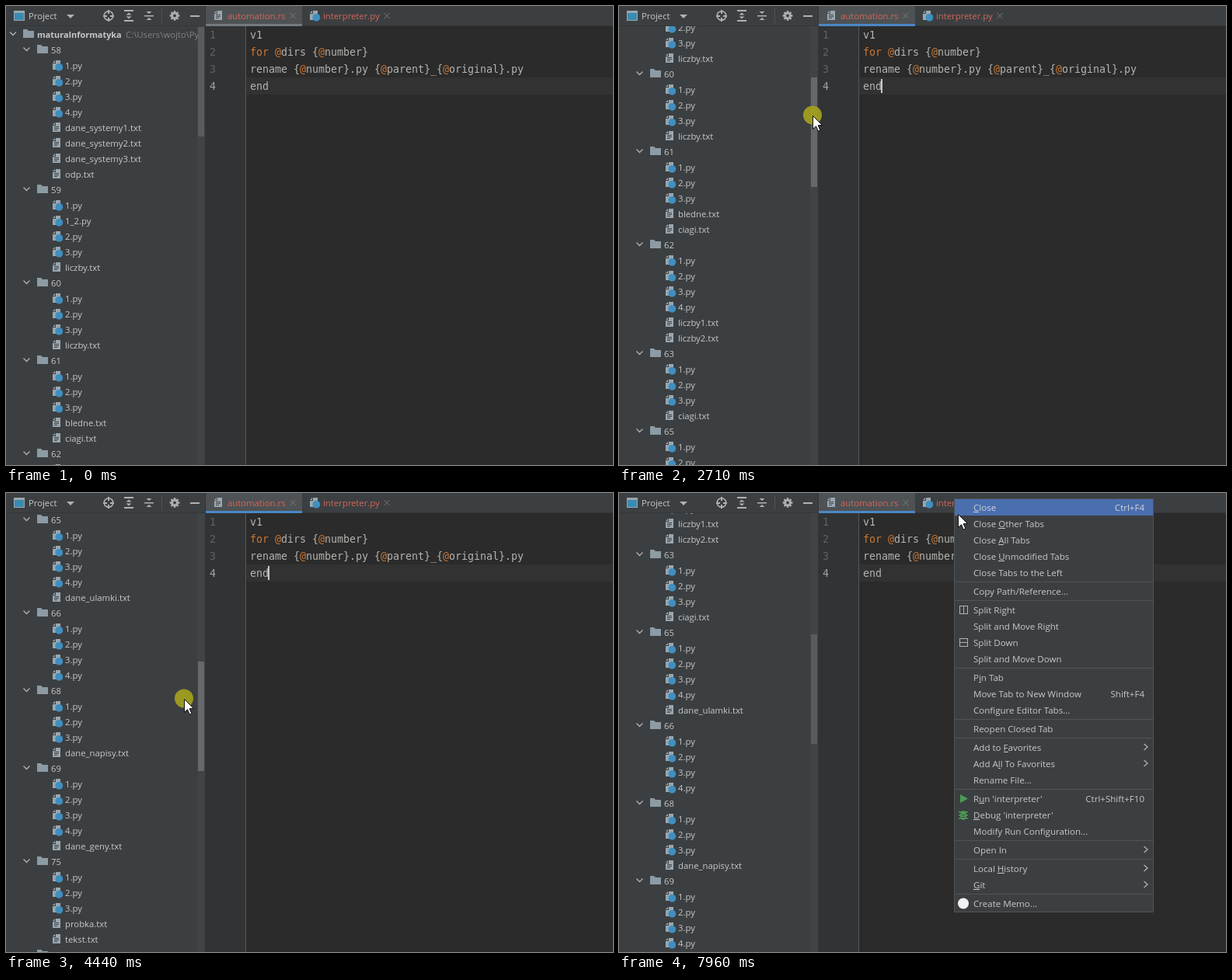
These frames come from a looping animation (781x591 px, 8 s). An HTML page with a canvas:

```html
<!DOCTYPE html>
<html lang="en">
<head>
<meta charset="utf-8">
<title>Project tree</title>
<style>
html, body { margin: 0; width: 100%; height: 100%; overflow: hidden; background: #2b2b2b; }
canvas { display: block; width: 781px; height: 591px; }
</style>
</head>
<body>
<canvas id="stage" width="781" height="591"></canvas>
<script>
const ctx = document.getElementById('stage').getContext('2d');
const LOOP = 8000;
const UI = '11.3px "Open Sans", sans-serif';
const UI_BOLD = 'bold 10.9px "Open Sans", sans-serif';
const UI_MENU = '11.55px "Open Sans", sans-serif';
const CODE = '13.3px "DejaVu Sans Mono", monospace';
const PANEL = '#3c3f41', LABEL = '#c6c8c9', ICON = '#afb1b3', FILE = '#9aa7b0', CHANGED = '#d1675a';

// Times of the interaction, in ms
const PRESS = 1320, RELEASE = 5090, TOP_CLICK = 5850, END_CLICK = 6090, MENU = 7400, HOVER_ITEM = 7910;
const GRAB_Y = 76, SCROLL_RATIO = 4.135, THUMB_RATIO = 4.12;

// Pointer path: time, x, y
const PATH = [
  [200, 697, 563], [480, 480, 300], [740, 264, 36], [840, 246, 48], [970, 249, 75],
  [1180, 253, 76], [PRESS, 253, 76], [1550, 252, 86], [2100, 251, 108], [2710, 249, 141],
  [3200, 241, 186], [3910, 226, 275], [4100, 226, 278], [4270, 226, 278], [4870, 236, 232],
  [5070, 236, 230], [5350, 370, 110], [5580, 490, 8], [5850, 450, 37], [6060, 377, 104],
  [6600, 377, 104], [6880, 436, 18], [7100, 431, 7], [HOVER_ITEM - 20, 431, 7], [7955, 436, 27]
];

// Folder | python files | text files
const TREE = [
  '58|1 2 3 4|dane_systemy1 dane_systemy2 dane_systemy3 odp',
  '59|1 1_2 2 3|liczby',
  '60|1 2 3|liczby',
  '61|1 2 3|bledne ciagi',
  '62|1 2 3 4|liczby1 liczby2',
  '63|1 2 3|ciagi',
  '65|1 2 3 4|dane_ulamki',
  '66|1 2 3 4|',
  '68|1 2 3|dane_napisy',
  '69|1 2 3 4|dane_geny',
  '75|1 2 3|probka tekst',
  '76|1 2 3|wykres'
];
const words = s => s.split(' ').filter(Boolean);
const rows = [{ kind: 'root', name: 'maturaInformatyka' }];
for (const entry of TREE) {
  const [dir, py, txt] = entry.split('|');
  rows.push({ kind: 'dir', name: dir });
  words(py).forEach(n => rows.push({ kind: 'py', name: n + '.py' }));
  words(txt).forEach(n => rows.push({ kind: 'txt', name: n + '.txt' }));
}

const SOURCE = ['v1', 'for @dirs {@number}', 'rename {@number}.py {@parent}_{@original}.py', 'end'];

// '-' starts a group, '&' marks the mnemonic; then shortcut and icon
const MENU_ITEMS = [
  ['&Close', 'Ctrl+F4'], ['Close &Other Tabs'], ['Close &All Tabs'], ['Close &Unmodified Tabs'],
  ['Close Tabs to the Left'], ['-Copy Path/Reference...'],
  ['-Split Right', '', 'right'], ['Split and Move Right'], ['Split Down', '', 'down'], ['Split and Move Down'],
  ['-P&in Tab'], ['Move Tab to New Window', 'Shift+F4'], ['Configure Editor Tabs...'],
  ['-Reopen Closed Tab'],
  ['-Add to &Favorites', '>'], ['Add A&ll To Favorites', '>'], ['Rename File...'],
  ["-R&un 'interpreter'", 'Ctrl+Shift+F10', 'run'], ["&Debug 'interpreter'", '', 'bug'], ['Modify Run Configuration...'],
  ['-Open In', '>'], ['-Local &History', '>'], ['&Git', '>'], ['-Create Memo...', '', 'dot']
];

function rect(x, y, w, h, color) {
  ctx.fillStyle = color;
  ctx.fillRect(x, y, w, h);
}
function text(s, x, y, color = LABEL, font = UI, align = 'left') {
  ctx.font = font;
  ctx.textAlign = align;
  ctx.fillStyle = color;
  ctx.fillText(s, x, y);
}
function poly(points, color) {
  ctx.beginPath();
  points.forEach(([x, y]) => ctx.lineTo(x, y));
  ctx.closePath();
  ctx.fillStyle = color;
  ctx.fill();
}
function line(points, color, width = 1) {
  ctx.beginPath();
  points.forEach(([x, y]) => ctx.lineTo(x, y));
  ctx.strokeStyle = color;
  ctx.lineWidth = width;
  ctx.stroke();
}
function disc(x, y, r, color) {
  ctx.beginPath();
  ctx.arc(x, y, r, 0, 7);
  ctx.fillStyle = color;
  ctx.fill();
}

function page(x, y) {
  poly([[x + 4, y], [x + 10, y], [x + 10, y + 12], [x, y + 12], [x, y + 4], [x + 4, y + 4]], FILE);
  poly([[x, y + 3], [x + 3, y], [x + 3, y + 3]], FILE);
}
function textFile(x, y) {
  page(x, y);
  for (const dy of [5, 7, 9]) rect(x + 2, y + dy, dy === 9 ? 4 : 6, 1, '#43484b');
}
function pythonFile(x, y) {
  page(x, y);
  disc(x + 8.3, y + 8.8, 4.9, '#3f8fc0');
}
function folder(x, y) {
  poly([[x, y], [x + 5, y], [x + 7, y + 2], [x + 14, y + 2], [x + 14, y + 11], [x, y + 11]], '#8d9ba4');
}
function chevronDown(x, y) {
  line([[x - 4, y - 2], [x, y + 2], [x + 4, y - 2]], ICON, 1.3);
}
function cross(x, y) {
  line([[x - 3.5, y - 3.5], [x + 3.5, y + 3.5]], '#777a7c');
  line([[x - 3.5, y + 3.5], [x + 3.5, y - 3.5]], '#777a7c');
}

function drawTree(scroll, dragging) {
  rect(0, 0, 256, 591, PANEL);
  rect(246, 26, 10, 565, '#414446');
  ctx.save();
  ctx.beginPath();
  ctx.rect(0, 26, 256, 565);
  ctx.clip();
  rows.forEach((row, i) => {
    const y = 36 + 20 * i - scroll;
    if (y < 10 || y > 605) return;
    if (row.kind === 'root') {
      chevronDown(9, y - 0.5);
      folder(22, y - 6);
      text(row.name, 40, y + 5, LABEL, UI_BOLD);
      text('C:\\Users\\wojto\\Py', 154, y + 5, '#7f8284');
    } else if (row.kind === 'dir') {
      chevronDown(26.5, y - 0.5);
      folder(40, y - 6);
      text(row.name, 58, y + 5);
    } else {
      (row.kind === 'py' ? pythonFile : textFile)(60, y - 6);
      text(row.name, 76, y + 5);
    }
  });
  ctx.restore();
  rect(247, 27 + Math.round(scroll / THUMB_RATIO), 8, 141, dragging ? '#66686a' : '#595b5d');
  drawToolbar();
  rect(256, 0, 1, 591, '#323436');
}

function drawToolbar() {
  rect(0, 0, 256, 25, PANEL);
  rect(0, 25, 256, 1, '#353739');
  rect(10, 6, 14, 13, FILE);
  rect(11, 9, 12, 9, '#3a8bb0');
  text('Project', 29, 17);
  poly([[78, 11], [88, 11], [83, 16]], ICON);

  ctx.beginPath();
  ctx.arc(132, 12.5, 5.8, 0, 7);
  ctx.strokeStyle = ICON;
  ctx.lineWidth = 1.5;
  ctx.stroke();
  rect(131, 5, 2, 5, ICON); rect(131, 15, 2, 5, ICON);
  rect(125, 12, 5, 2, ICON); rect(134, 12, 5, 2, ICON);

  // Expand all: bars outside, arrows pointing out
  rect(152, 5, 12, 2, ICON); rect(152, 18, 12, 2, ICON);
  poly([[154.5, 11.5], [161.5, 11.5], [158, 8.5]], ICON);
  poly([[154.5, 13.5], [161.5, 13.5], [158, 16.5]], ICON);
  // Collapse all: bar in the middle, arrows pointing in
  rect(178, 12, 12, 1.5, ICON);
  poly([[180.5, 7], [187.5, 7], [184, 10]], ICON);
  poly([[180.5, 18], [187.5, 18], [184, 15]], ICON);

  rect(200, 3, 1, 19, '#515456');
  for (let i = 0; i < 4; i++) {
    const a = i * Math.PI / 4, c = 6.3 * Math.cos(a), s = 6.3 * Math.sin(a);
    line([[217 - c, 12.5 - s], [217 + c, 12.5 + s]], ICON, 2.6);
  }
  disc(217, 12.5, 4.6, ICON);
  disc(217, 12.5, 2, PANEL);
  rect(237, 12, 12, 2, ICON);
}

function drawTabs(focused, hover) {
  rect(257, 0, 524, 25, PANEL);
  rect(257, 25, 524, 1, '#323436');
  rect(257, 0, 124, 25, '#4e5254');
  rect(257, 23, 124, 3, focused ? '#4a88c7' : '#747a80');
  textFile(268, 6);
  text('automation.rs', 285, 17, CHANGED);
  cross(369, 12.5);
  if (hover) rect(381, 0, 121, 25, '#2a2c2d');
  pythonFile(391, 6);
  text('interpreter.py', 408, 17, CHANGED);
  cross(490, 12.5);
}

function drawEditor(caretRow, caretOn) {
  rect(257, 26, 51, 565, '#313335');
  rect(308, 26, 1, 565, '#555759');
  rect(309, 26, 472, 565, '#2b2b2b');
  rect(309, 26 + 22 * caretRow, 472, 22, '#323232');
  SOURCE.forEach((code, i) => {
    const y = 42 + 22 * i;
    text(String(i + 1), 262, y, i === caretRow ? '#a4a3a3' : '#606366', CODE);
    [...code].forEach((ch, col) => {
      const keyword = ch === '@' || (i === 1 && col < 3);
      text(ch, 314 + 8 * col, y, keyword ? '#cc7832' : '#b3b4b0', CODE);
    });
  });
  if (caretOn) rect(313 + 8 * SOURCE[caretRow].length, 28 + 22 * caretRow, 2, 18, '#c8c8c8');
}

function menuIcon(kind, y) {
  if (kind === 'right' || kind === 'down') {
    ctx.strokeStyle = ICON;
    ctx.lineWidth = 1;
    ctx.strokeRect(438.5, y - 5.5, 10, 10);
    if (kind === 'right') rect(443, y - 5, 1, 10, ICON);
    else rect(439, y - 1, 10, 1, ICON);
  } else if (kind === 'run') {
    poly([[439, y - 6], [449, y - 0.5], [439, y + 5]], '#499c54');
  } else if (kind === 'bug') {
    for (const dy of [-4, 0, 4]) rect(437, y + dy - 1, 12, 1.5, '#499c54');
    ctx.beginPath();
    ctx.ellipse(443, y, 4, 6, 0, 0, 7);
    ctx.fillStyle = '#499c54';
    ctx.fill();
    rect(441, y - 1, 4, 1, PANEL);
    rect(441, y + 2, 4, 1, PANEL);
  } else if (kind === 'dot') {
    disc(443, y - 0.5, 7, '#f2f2f2');
  }
}

function drawMenu(selected) {
  rect(431, 7, 257, 533, '#515456');
  rect(432, 8, 255, 531, PANEL);
  let y = -2;
  MENU_ITEMS.forEach(([raw, extra = '', icon], i) => {
    const split = raw[0] === '-';
    y += split ? 24 : 21;
    if (split) rect(432, y - 13, 255, 1, '#515456');
    const active = selected && i === 0;
    if (active) rect(432, 8, 255, 21, '#4b6eaf');
    const marked = raw.replace(/^-/, ''), at = marked.indexOf('&');
    const label = marked.replace('&', ''), color = active ? '#d2d5da' : LABEL;
    text(label, 456, y + 4, color, UI_MENU);
    if (at >= 0) {
      const x = 456 + ctx.measureText(label.slice(0, at)).width;
      rect(Math.round(x), y + 5, Math.round(ctx.measureText(label[at]).width), 1, color);
    }
    if (extra === '>') line([[675.5, y - 5], [680, y - 1], [675.5, y + 3]], ICON, 1.3);
    else text(extra, 676, y + 4, color, UI_MENU, 'right');
    menuIcon(icon, y);
  });
}

function pointerAt(t) {
  const next = PATH.findIndex(p => p[0] > t);
  if (next < 0) return PATH[PATH.length - 1].slice(1);
  const [t0, x0, y0] = PATH[next - 1], [t1, x1, y1] = PATH[next];
  const k = (t - t0) / (t1 - t0);
  return [Math.round(x0 + (x1 - x0) * k), Math.round(y0 + (y1 - y0) * k)];
}

function drawPointer(x, y, beam) {
  if (beam) {
    const c = '#dedec0';
    rect(x + 1, y - 7, 1, 16, c);
    rect(x - 2, y - 8, 3, 1, c); rect(x + 2, y - 8, 3, 1, c);
    rect(x - 2, y + 9, 3, 1, c); rect(x + 2, y + 9, 3, 1, c);
    return;
  }
  ctx.save();
  ctx.translate(x + 0.5, y + 0.5);
  const shape = [[0, 0], [0, 17], [4, 13.2], [6.8, 19.5], [9.4, 18.4], [6.6, 12.2], [12, 12], [0, 0]];
  poly(shape, '#fff');
  line(shape, '#111', 1);
  ctx.restore();
}

function caretVisible(t) {
  if (t < 1390 || t >= 7590) return false;
  const start = t >= END_CLICK ? END_CLICK : t >= TOP_CLICK ? TOP_CLICK : 1390;
  return (t - start) % 1000 < 500;
}

function draw(t) {
  const between = (a, b) => t >= a && t < b;
  const moving = t >= PATH[0][0];
  const [x, y] = moving ? pointerAt(t) : [0, 0];
  const dragging = between(PRESS, RELEASE);
  const travel = t < PRESS ? 0 : t < 5070 ? y - GRAB_Y : 154;

  drawEditor(between(TOP_CLICK, END_CLICK - 20) ? 0 : 3, caretVisible(t));
  drawTabs(t >= PRESS, between(6860, MENU));
  drawTree(Math.round(travel * SCROLL_RATIO), dragging);
  if (t >= MENU) drawMenu(t >= HOVER_ITEM);

  if (!moving) return;
  const pressed = dragging || between(TOP_CLICK, TOP_CLICK + 70) || between(6060, 6380);
  if (pressed) disc(x, y - 0.5, 12, 'rgba(164,161,30,0.92)');
  drawPointer(x, y, x > 309 && y > 26 && t < MENU);
}

function tick(now) {
  draw(now % LOOP);
  requestAnimationFrame(tick);
}
requestAnimationFrame(tick);
</script>
</body>
</html>
```
